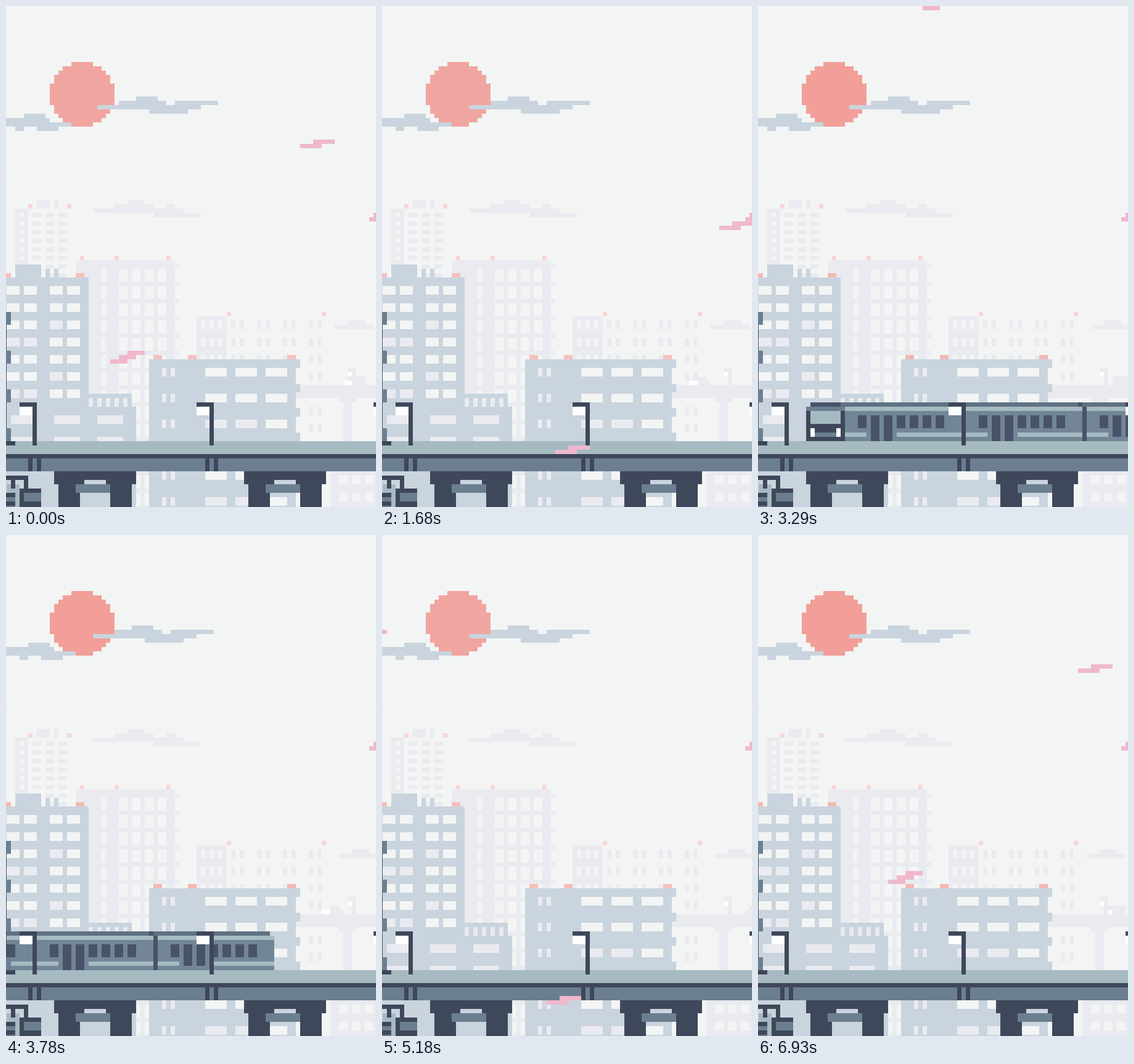
Recreate the animation shown at these times as an HTML page with a canvas. Size 600 by 814 pixels, loop 7 s.

```html
<!DOCTYPE html>
<html lang="en">
<head>
<meta charset="utf-8">
<title>Pixel city</title>
<style>
html, body { margin: 0; width: 100%; height: 100%; overflow: hidden; background: #f3f5f4; }
canvas { display: block; }
</style>
</head>
<body>
<canvas id="stage" width="600" height="814"></canvas>
<script>
const ctx = document.getElementById('stage').getContext('2d');
const STEP = 70, STEPS = 100, COLS = 86, ROWS = 117;
const SKY = '#f3f5f4', FAR = '#eaebf0', MID = '#c9d4de', PALE = '#a6bac2',
  SLATE = '#6b7f90', DARK = '#3f475a', GLASS = '#48536a', BODY = '#728696', ROOF = '#5f7283',
  WHITE = '#ffffff', FAR_LIGHT = '#f8d6d6', PETAL = '#efb8cc';

// All coordinates are cells of 7 px; the grid starts 1 px from the left.
ctx.setTransform(7, 0, 0, 7, 1, 0);

function box(color, x, y, w = 1, h = 1) {
  ctx.fillStyle = color;
  ctx.fillRect(x, y, w, h);
}

// Grid of equal boxes; color may depend on row and column.
function grid(color, x, y, w, h, cols, dx, rows, dy) {
  for (let r = 0; r < rows; r++)
    for (let c = 0; c < cols; c++)
      box(typeof color === 'string' ? color : color(r, c), x + c * dx, y + r * dy, w, h);
}

const wrap = n => (n % STEPS + STEPS) % STEPS;
const isWarm = n => (n >= 30 && n < 55) || n >= 94;

function sun(n) {
  for (let y = -7; y <= 7; y++) {
    const half = Math.floor(Math.sqrt(55 - y * y));
    box(isWarm(n) ? '#f19f98' : '#f1a5a0', 17 - half, 20 + y, 2 * half + 1, 1);
  }
}

function cloud(color, x, y, w, tail) {
  const part = (from, size, dy) =>
    box(color, x + Math.round(w * from), y + dy, Math.round(w * size), 1);
  part(0, 1, 0);
  part(.22, .45, -1);
  part(.38, .2, -2);
  box(color, x + tail, y + 1, tail - 3, 1);
}

function clouds(n) {
  const drift = wrap(2 * (n - 2)) < 50 ? 1 : 0;
  cloud(MID, 21 - drift, 23, 24, 12);
  box(MID, 39 - drift, 22, 10);
  for (let k = 0; k < 3; k++) box(MID, k ? -1 : 4 + drift, 25 + k, k ? 8 + 4 * k + drift - (k < 2) : 5);
  box(MID, 2 + drift, 28, 2);
  box(MID, 7 + drift, 28, 5);

  cloud(FAR, 20, 47, 21, 14);
  box(FAR, 37, 46, 2);
  const far = n > 26 && n <= 76 ? 1 : 0;
  box(FAR, 79 + far, 73, 4);
  box(FAR, 76 + far, 74, 9);
}

function farCity() {
  box(FAR, 7, 45, 3, 2);
  box(FAR, 11, 45, 1, 2);
  box(FAR, 2, 47, 3, 16);
  grid(SKY, 3, 48, 1, 1, 1, 0, 7, 2);
  grid(FAR, 6, 48, 2, 1, 3, 3, 8, 2);

  box(FAR, 16, 59, 23, 58);
  grid(SKY, 26, 61, 2, 3, 4, 3, 14, 4);
  grid(SKY, 22, 61, 1, 3, 1, 0, 14, 4);
  grid(FAR, 39, 60, 1, 1, 1, 0, 6, 4);

  box(FAR, 44, 72, 7, 12);
  grid(SKY, 45, 73, 1, 2, 3, 2, 3, 4);
  for (const x of [52, 54]) grid(FAR, x, 73, 1, 2, 4, 6, 7, 4);

  grid(FAR_LIGHT, 5, 46, 1, 1, 2, 9, 1, 0);
  for (const x of [17, 25, 37]) box(FAR_LIGHT, x, 58);
  grid(FAR_LIGHT, 51, 71, 1, 1, 2, 22, 1, 0);
  box(FAR_LIGHT, -1, 39);

  box(FAR, 67, 88, 19, 3);
  box(FAR, 77, 91, 4, 1);
  box(FAR, 78, 92, 2, 9);
  box(FAR, 75, 108, 11, 9);
  grid(SKY, 77, 109, 2, 2, 3, 3, 2, 4);
}

// Cars move two cells per step; a phase is the front column at time zero.
function lane(n, dir, phases, tall) {
  for (const phase of phases) {
    const x = (phase + dir * 2 * n + 4 * STEPS) % (2 * STEPS);
    if (x < 45) continue;
    box(WHITE, x, 87, dir < 0 ? 2 : 1);
    box(FAR, dir < 0 ? x + 2 : x - 4, 87, dir < 0 ? 3 : 4);
    if (tall) box(FAR, dir < 0 ? x + 1 : x - 4, 86, 4);
    else box(FAR, dir < 0 ? x + 2 : x - 3, 86, 2);
  }
}

function traffic(n) {
  lane(n, -1, [78], true);
  lane(n, -1, [119, 181, 210]);
  lane(n, 1, [110, 192], true);
  lane(n, 1, [9, 140]);
  box(FAR, 79, 84, 2);
  box(FAR, 80, 85, 1, 3);
  box(WHITE, 79, 85);
}

function midCity(n) {
  const tint = (r, c) => r && (3 * r + c + 1) % 9 < 3 ? FAR : SKY;
  box(MID, -1, 63, 20, 54);
  box(MID, 2, 60, 6, 3);
  grid(MID, 9, 61, 1, 2, 2, 2, 1, 0);
  grid(tint, 0, 65, 3, 2, 2, 4, 7, 4);
  grid((r, c) => tint(r, c + 2), 10, 65, 3, 2, 1, 0, 7, 4);
  grid(SKY, 14, 65, 3, 2, 1, 0, 7, 4);
  box(MID, 19, 90, 10, 3);
  box(MID, 19, 93, 11, 24);
  grid(FAR, 19, 91, 1, 2, 5, 2, 1, 0);
  grid(FAR, 1, 95, 6, 2, 3, 10, 2, 5);

  box(MID, 33, 82, 34, 35);
  grid(MID, 67, 82, 1, 2, 1, 0, 4, 5.67);
  grid(FAR, 36, 84, 1, 2, 2, 2, 6, 6);
  grid((r, c) => r % 3 === 2 && c < 2 ? FAR : SKY, 46, 84, 5, 2, 3, 7, 6, 6);

  const light = isWarm(n) ? '#f4b8b4' : '#f5c0bc';
  grid(light, -1, 62, 2, 1, 2, 17, 1, 0);
  for (const x of [34, 42, 65]) box(light, x, 81, 2);
}

function trainHead(x) {
  box(DARK, x, 94, 9, 7);
  box(SLATE, x, 93, 9);
  box(GLASS, x + 1, 92, 7);
  box(PALE, x + 1, 94, 7, 3);
  box(SLATE, x + 2, 99, 5);
  grid(WHITE, x + 1, 98, 1, 2, 2, 6, 1, 0);
}

function trainCar(x, last) {
  box(BODY, x, 93, 27, 8);
  box(ROOF, x - 1, 92, 27);
  box(PALE, x, 93, 27);
  box(PALE, x, 99, 5);
  box(PALE, x + 12, 99, 15);
  box(GLASS, x + 3, 95, 2, 3);
  grid(GLASS, x + 6, 95, 2, last ? 5 : 6, 2, 3, 1, 0);
  grid(GLASS, x + 12, 95, 2, 3, 4, 3, 1, 0);
  if (!last) {
    box(GLASS, x + 26, 92);
    box(GLASS, x + 27, 93, 1, 8);
  }
}

function train(n) {
  const front = Math.round(58 - 88 / 15 * (n - 39));
  trainHead(front);
  for (let k = 0; k < 3; k++) trainCar(front + 9 + 28 * k, k === 2);
}

function pier(x) {
  box(DARK, x, 108, 19, 3);
  grid(DARK, x + 1, 111, 5, 6, 2, 12, 1, 0);
  box(MID, x + 7, 110, 5);
  box(SLATE, x + 5, 111, 8, 2);
}

function streetLamp(x) {
  box(WHITE, x, 93, 3, 2);
  box(DARK, x, 92, 4);
  box(DARK, x + 3, 92, 1, 10);
  grid(DARK, x + 2, 105, 1, 3, 2, 2, 1, 0);
}

function scooter() {
  box(PALE, 0, 111, 3, 6);
  box(DARK, -1, 109, 6);
  box(DARK, 1, 110, 1, 2);
  box(DARK, 4, 110, 1, 2);
  box(DARK, 3, 112, 5, 5);
  box(SLATE, 4, 113, 4, 2);
  for (let y = 113; y < ROWS; y++) box(y % 2 ? DARK : SLATE, -1, y, 3);
}

function bridge() {
  for (const x of [11, 55]) pier(x);
  box(DARK, -1, 71, 1, 31);
  grid(SLATE, -1, 71, 2, 3, 1, 0, 4, 9);
  box(PALE, -1, 101, COLS + 1, 3);
  box(DARK, -1, 104, COLS + 1, 1);
  box(SLATE, -1, 105, COLS + 1, 3);
  box(DARK, -1, 101, 3);
  for (let x = 3; x < COLS; x += 41) streetLamp(x);
  scooter();
}

// A streak on a straight flight, passing (col, row) at the given step.
function petal(n, at, col, row, slope) {
  const f = wrap(n - at + STEPS / 2) - STEPS / 2;
  const steep = Math.abs(slope) > 1;
  for (let k = 0; k < (steep ? 3 : 2); k++)
    box(PETAL, col - 6 * f + k * (steep ? 2 : 3),
      row + slope * f - Math.sign(slope) * k, steep ? 4 : 5);
}

function blossoms(n) {
  const swayed = n >= 80 && n < 90;
  box(PETAL, 85, 48);
  box(PETAL, 84, swayed ? 47 : 49, 2);

  petal(n, 0, 68, 32, 1);
  petal(n, 0, 24, 82, 2);
  petal(n, 24, 40, 103, 1);
  petal(n, 24, 78, 51, 1);
  petal(n, 39, 0, 68, -1);
  petal(n, 65, 47, 30, -1);
  petal(n, 65, 28, 107, 2);
  petal(n, 66, 86, 100, 1);
  for (const gust of [30, 44, 93]) petal(n, gust, 52, 4, -2);
}

function draw(ms) {
  const n = Math.floor(ms / STEP) % STEPS;
  box(SKY, -1, 0, COLS + 1, ROWS);
  sun(n);
  clouds(n);
  farCity();
  traffic(n);
  midCity(n);
  train(n);
  bridge();
  blossoms(n);
}

const start = performance.now();
function tick() {
  draw(performance.now() - start);
  requestAnimationFrame(tick);
}
tick();
</script>
</body>
</html>
```
